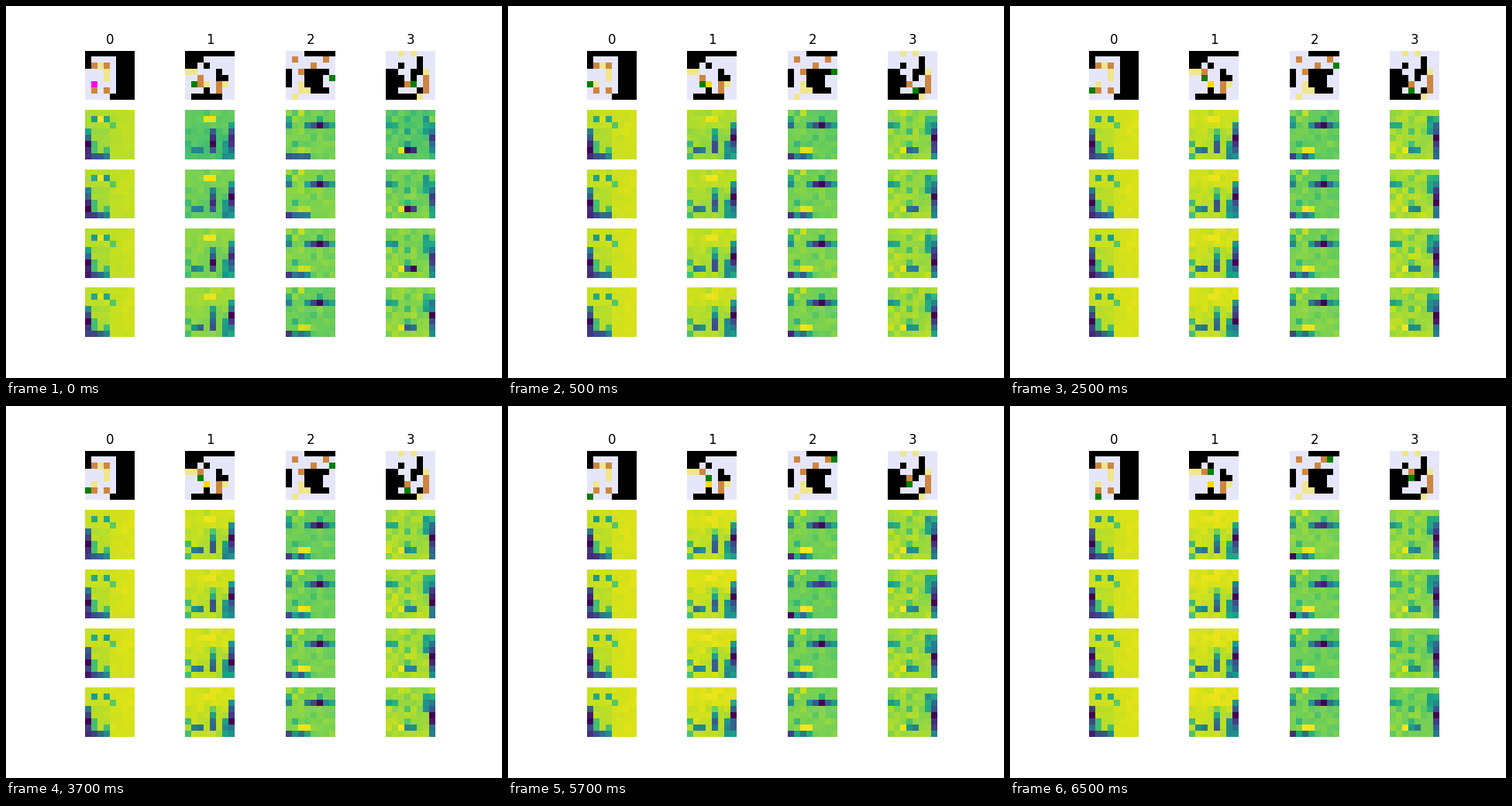
These frames come from a looping animation (640 px wide and 480 px high, 8000 ms). A matplotlib script:

```python
import matplotlib.pyplot as plt
import numpy as np
from matplotlib.animation import FuncAnimation
from matplotlib.colors import to_rgb

SIZE, PANELS, HEAT_ROWS = 8, 4, 4
INTERVAL, FRAMES = 500, 16
MOVES = {"L": (0, -1), "R": (0, 1), "U": (-1, 0), "D": (1, 0)}
ROW, COL = np.mgrid[:SIZE, :SIZE]

FLOOR, WALL, GOAL = "lavender", "black", "khaki"
BOX, BOX_ON_GOAL, AGENT, AGENT_ON_GOAL = "peru", "gold", "green", "magenta"

# Walls are blocks (row, column, height, width); other items are (row, column).
LEVELS = [
    dict(walls=[(0, 0, 1, 8), (1, 0, 2, 1), (1, 5, 7, 3), (7, 4, 1, 1)],
         goals=[(2, 2), (3, 3), (4, 3), (5, 1)],
         boxes=[(2, 1), (2, 3), (6, 1), (6, 3)],
         start=(5, 1), moves="LDDR"),
    dict(walls=[(0, 0, 1, 8), (1, 0, 1, 3), (2, 0, 1, 2), (2, 3, 1, 1),
                (3, 5, 2, 1), (4, 6, 1, 1), (6, 3, 1, 1), (7, 1, 1, 5)],
         goals=[(3, 0), (3, 1), (5, 3), (5, 6)],
         boxes=[(4, 2), (5, 2), (5, 5), (6, 5)],
         start=(5, 1), moves="RURU"),
    dict(walls=[(0, 3, 1, 5), (3, 0, 3, 1), (3, 3, 1, 4), (4, 3, 2, 3), (6, 4, 1, 3)],
         goals=[(5, 2), (6, 2), (6, 3), (7, 1)],
         boxes=[(1, 1), (1, 6), (2, 4), (3, 2)],
         start=(4, 7), moves="UUUL"),
    dict(walls=[(1, 5, 3, 1), (2, 2, 1, 1), (3, 0, 5, 2), (3, 4, 2, 1),
                (4, 2, 2, 1), (6, 5, 1, 1), (7, 2, 1, 3)],
         goals=[(0, 2), (0, 4), (3, 6), (7, 5)],
         boxes=[(4, 6), (5, 3), (5, 6), (6, 6)],
         start=(5, 4), moves="DLUU"),
]


def play(level, step):
    """Walk the agent through its first moves, pushing boxes it runs into."""
    agent, boxes = level["start"], set(level["boxes"])
    for move in level["moves"][:step]:
        dr, dc = MOVES[move]
        agent = (agent[0] + dr, agent[1] + dc)
        if agent in boxes:
            boxes.remove(agent)
            boxes.add((agent[0] + dr, agent[1] + dc))
    return agent, boxes


def board(panel, step):
    level = LEVELS[panel]
    agent, boxes = play(level, step)
    image = np.full((SIZE, SIZE, 3), to_rgb(FLOOR))
    for row, col, height, width in level["walls"]:
        image[row:row + height, col:col + width] = to_rgb(WALL)
    for cell in level["goals"]:
        image[cell] = to_rgb(GOAL)
    for cell in boxes:
        image[cell] = to_rgb(BOX_ON_GOAL if cell in level["goals"] else BOX)
    image[agent] = to_rgb(AGENT_ON_GOAL if agent in level["goals"] else AGENT)
    return image


def mix(start, end, t):
    return start + (end - start) * t


def valley(axis, center, slope):
    """Dark at the center, brighter in proportion to the distance from it."""
    return np.minimum(slope * abs(axis - center), .8)


# Each painter fills one heat map; t runs from 0 towards 1 as values settle.
def paint_left_edge(tick, t):
    field = mix(.89, .935, t) + .004 * (COL - 4)
    field[3:7, 1:4] -= .03
    field[3:, 0] = valley(ROW[3:, 0], mix(5.8, 4.2, tick / 19), .2)
    field[7, :4] = .12 + .11 * COL[7, :4]
    field[1, 1:4:2] = .6
    field[1, 2] = mix(1, .91, t)
    field[2, 4] = .74
    field[5, 1] = field[6, 1] = field[6, 3] = .7
    return field


def paint_center_column(tick, t):
    field = mix(.74, .935, t) + .015 * np.sign(2.5 - ROW)
    field[4:, 5:] -= .03
    field[2:, 7] = .05 + valley(ROW[2:, 7], 4.4, .2)
    field[3:7, 4] = mix(.05 + valley(ROW[3:7, 4], 4.7, .15),
                        .22 + valley(ROW[3:7, 4], 5.6, .23), t)
    field[5:, 6] = .53
    field[6, 1:3] = .42
    field[5::2, 0] = .68
    field[1, 3:5] = .97
    return field


def paint_crossbar(tick, t):
    field = .79 + .02 * np.sin(1.3 * tick) + 0 * ROW
    field[2, 3:] = .02 + valley(COL[2, 3:], 4.8, .27)
    field[1:3, 0] = .65, .45
    field[1, 5] = field[5, 1] = .65
    field[0, 2] = .9
    field[6, 2:4] = mix(.87, 1, t)
    field[7, :4:2] = .15 + .1 * COL[7, :4:2]
    field[7, 1:4:2] = mix(.35, .62, t)
    return field


def paint_right_edge(tick, t):
    field = .74 + .13 * np.sqrt(np.sin(np.pi * tick / 20)) + 0 * ROW
    field[1:, 7] = mix(.2, 0, t) + valley(ROW[1:, 7], 4.3, .17)
    field[1:4, 6] = .6
    field[1:6:2, 3] -= .12
    field[2, :2] = .6
    field[6, 2] = .97
    field[6, 3:5] = mix(.1, .5, t)
    return field


PAINTERS = [paint_left_edge, paint_center_column, paint_crossbar, paint_right_edge]


def heat(panel, step, row):
    tick = step * HEAT_ROWS + row
    field = PAINTERS[panel](tick, 1 - np.exp(-tick / 4))
    grain = np.random.default_rng(panel + 1).normal(0, 1, (SIZE, SIZE))
    flicker = np.random.default_rng((panel, tick)).normal(0, .5, (SIZE, SIZE))
    field += .006 * (panel + 1) * (grain + flicker)
    # Weak values waver more than strong ones.
    field += .08 * flicker * (field < .6)
    field[np.unravel_index(field.argmin(), field.shape)] = 0
    return np.clip(field, 0, 1)


fig, axes = plt.subplots(HEAT_ROWS + 1, PANELS, figsize=(6.4, 4.8), dpi=100)
for ax in axes.flat:
    ax.axis("off")
boards = [axes[0, p].imshow(board(p, 0)) for p in range(PANELS)]
heats = {(p, r): axes[r + 1, p].imshow(heat(p, 0, r), cmap="viridis", vmin=0, vmax=1)
         for p in range(PANELS) for r in range(HEAT_ROWS)}
for p in range(PANELS):
    axes[0, p].set_title(str(p))


def update(frame):
    step = (frame + 3) // 4
    for p, image in enumerate(boards):
        image.set_data(board(p, step))
    for (p, r), image in heats.items():
        image.set_data(heat(p, step, r))
    return [*boards, *heats.values()]


anim = FuncAnimation(fig, update, frames=FRAMES, interval=INTERVAL,
                     repeat=True, repeat_delay=0, blit=False)
plt.show()
```
